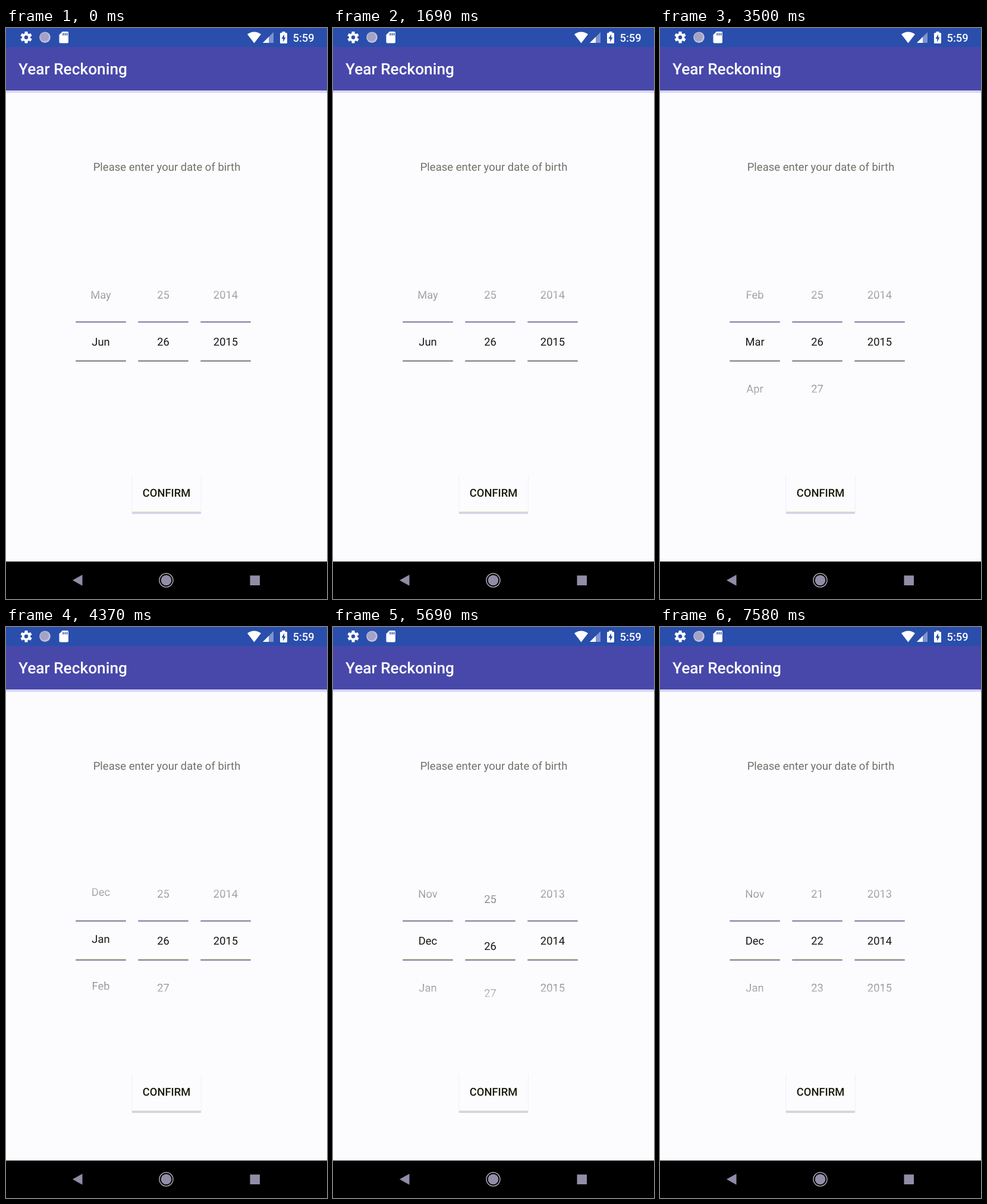
These frames come from a looping animation (540 px wide and 960 px high, 8000 ms). An HTML page:

```html
<!DOCTYPE html>
<html lang="en">
<head>
<meta charset="utf-8">
<title>Date of birth picker</title>
<style>
  html, body { margin: 0; width: 100%; height: 100%; overflow: hidden; background: #fcfcff; }
  svg { display: block; width: 540px; height: 960px; }
  text { font: 18.375px Roboto, sans-serif; text-rendering: geometricPrecision; }
  .mid { text-anchor: middle; }
  .medium { font-weight: 500; }
  .title { font-size: 26.25px; }
  .prompt { font-size: 18.55px; }
  #wheels { fill: #171712; }
</style>
</head>
<body>
<svg viewBox="0 0 540 960">
  <defs>
    <linearGradient id="fade" gradientUnits="userSpaceOnUse" x1="0" y1="410" x2="0" y2="646">
      <stop offset="0" stop-color="#fff" stop-opacity="0"/>
      <stop offset=".43" stop-color="#fff"/>
      <stop offset=".57" stop-color="#fff"/>
      <stop offset="1" stop-color="#fff" stop-opacity="0"/>
    </linearGradient>
    <mask id="window" maskUnits="userSpaceOnUse" x="100" y="410" width="330" height="236">
      <rect x="100" y="410" width="330" height="236" fill="url(#fade)"/>
    </mask>
    <path id="tooth" d="M0-9.7v4M0 9.7v-4" stroke="#fff" stroke-width="5"/>
    <g id="dividers">
      <path d="M0 494.250h84.500" stroke="#918eae" stroke-width="2.500"/>
      <path d="M0 558.500h84.500" stroke="#cfcf9c"/>
      <path d="M0 560h84.500" stroke="#8b88a8" stroke-width="2"/>
    </g>
  </defs>

  <rect width="540" height="960" fill="#fcfcff"/>
  <rect y="105" width="540" height="4" fill="#d8d8f6"/>
  <rect y="32" width="540" height="73" fill="#4848aa"/>
  <rect width="540" height="32" fill="#2a4eac"/>

  <!-- status bar -->
  <g transform="translate(34 15.700)">
    <circle r="5.200" fill="none" stroke="#fff" stroke-width="4"/>
    <use href="#tooth"/>
    <use href="#tooth" transform="rotate(60)"/>
    <use href="#tooth" transform="rotate(120)"/>
  </g>
  <circle cx="65.500" cy="15.700" r="9.300" fill="#c2c0d8"/>
  <circle cx="64.800" cy="15" r="7.300" fill="#a3a2c8"/>
  <path d="M95 6h8q2 0 2 2v15.500q0 2-2 2H91.500q-2 0-2-2V11.500z" fill="#fff"/>
  <path d="M96.300 8.500v4M99.500 8.500v4M102.700 8.500v4" stroke="#2a4eac" stroke-width="1.700"/>
  <path d="M417.500 25.500L406 10.500Q417.500 2.500 429 10.500z" fill="#fff"/>
  <path d="M432 25h18V7z" fill="#fff" opacity=".4"/>
  <path d="M432 25h10V15z" fill="#fff"/>
  <path d="M464.500 6h5v2h2q1.500 0 1.500 1.500v15q0 1.500-1.500 1.500h-9q-1.500 0-1.500-1.500v-15q0-1.500 1.500-1.500h2z" fill="#fff"/>
  <path d="M468 10.500l-4.500 7.500h2.700v5.500l4.300-7.700h-2.500z" fill="#2a4eac"/>
  <text class="medium" x="482.500" y="23" fill="#fff">5:59</text>

  <text class="medium title" x="21" y="78" fill="#fff">Year Reckoning</text>
  <text class="mid prompt" x="270.500" y="240" fill="#70706a">Please enter your date of birth</text>

  <!-- date wheels -->
  <g id="wheels" class="mid" mask="url(#window)"></g>
  <use href="#dividers" x="117.300"/>
  <use href="#dividers" x="222.300"/>
  <use href="#dividers" x="327.300"/>

  <!-- button -->
  <path d="M211.500 752v63M328.500 752v63" stroke="#f0f0f8"/>
  <path d="M212 813.500h116" stroke="#dfdfb2"/>
  <path d="M212 815.500h116" stroke="#d5d4ea" stroke-width="3"/>
  <text class="mid medium" x="270" y="788" fill="#1b1b0c">CONFIRM</text>

  <!-- navigation bar -->
  <rect y="897" width="540" height="63"/>
  <g fill="#918da8">
    <path d="M112 928.500l16.500-9.300v18.600z"/>
    <circle cx="269.500" cy="928.500" r="8.800"/>
    <circle cx="269.500" cy="928.500" r="11.500" fill="none" stroke="#aaa7b4" stroke-width="1.500"/>
    <rect x="410.500" y="920.500" width="16.500" height="16.500"/>
  </g>
</svg>
<script>
const LOOP = 8000, STEP = 300, ROW = 79, BASELINE = 534;
const MONTHS = 'Jan Feb Mar Apr May Jun Jul Aug Sep Oct Nov Dec'.split(' ');
const monthSteps = [2457, 2880, 3222, 3876, 4227, 4574];
const daySteps = [5671, 6010, 6348, 7280];
const SWITCH = 74; // time into a step at which the date itself changes

const wheels = document.getElementById('wheels');
const makeWheel = x => [-2, -1, 0, 1, 2].map(() => {
  const row = document.createElementNS('http://www.w3.org/2000/svg', 'text');
  row.setAttribute('x', x);
  return wheels.appendChild(row);
});
const [months, days, years] = [159.5, 264.5, 369.5].map(makeWheel);

// viscous scroll: short pick-up, then exponential settling
function viscous(p) {
  if (p <= 0) return 0;
  if (p >= 1) return 1;
  const u = 8 * p;
  return u < 1 ? u - 1 + Math.exp(-u) : 1 - (1 - Math.exp(-1)) * Math.exp(1 - u);
}

const travel = (steps, t) => steps.reduce((sum, s) => sum + viscous((t - s) / STEP), 0);

function drawWheel(rows, pos, max, label) {
  const first = Math.round(pos) - 2;
  rows.forEach((row, i) => {
    const n = first + i;
    const text = n > max ? '' : String(label(n));
    if (row.textContent !== text) row.textContent = text;
    row.setAttribute('y', BASELINE + Math.round((n - pos) * ROW));
  });
}

function draw(t) {
  const atLimit = t < monthSteps[0] + SWITCH;
  const lastYear = t >= monthSteps[5] + SWITCH;
  drawWheel(months, 5 - travel(monthSteps, t), atLimit ? 5 : 11, n => MONTHS[(n + 12) % 12]);
  drawWheel(days, 26 - travel(daySteps, t), atLimit ? 26 : 31, n => n);
  drawWheel(years, lastYear ? 2014 : 2015, 2015, n => n);
}

const start = performance.now();
function tick() {
  draw((performance.now() - start) % LOOP);
  requestAnimationFrame(tick);
}
tick();
</script>
</body>
</html>
```
